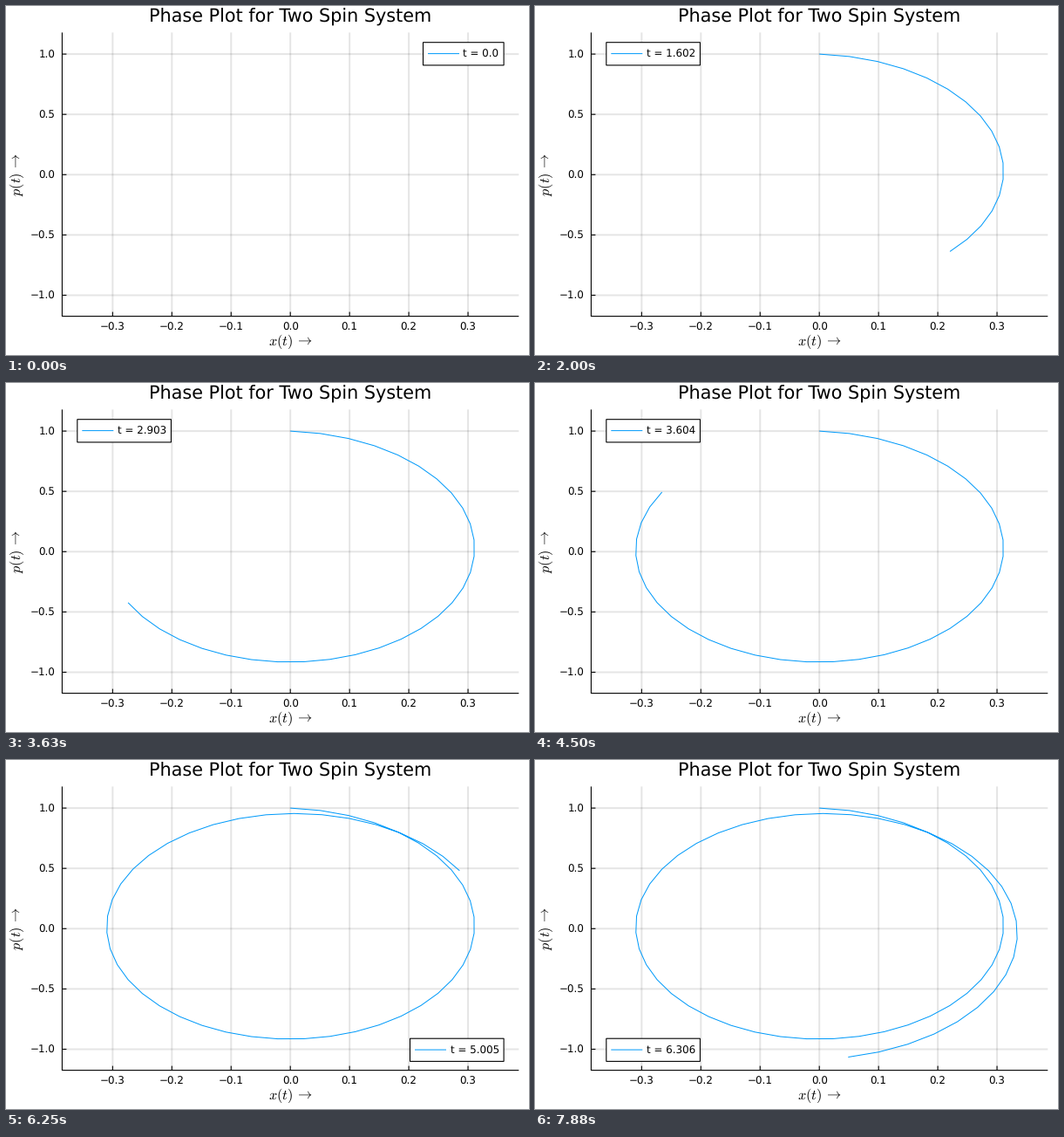
Animation of 600 by 400 pixels, one loop 8000 ms. Source, as a matplotlib script:

```python
import numpy as np
import matplotlib.pyplot as plt
from matplotlib.animation import FuncAnimation
from matplotlib.patches import Rectangle

W, H, DPI = 600, 400, 100
FRAMES, INTERVAL = 64, 125
DT = 100 / 999
PT = 72 / DPI                      # points per pixel
BLUE = "#009afa"

LEFT, RIGHT, TOP, BOTTOM = 64.4, 588.3, 30.4, 355.6
CX, CY, SX, SY = 326.2, 193.3, 679.5, 138.2

plt.rcParams.update({
    "font.family": "DejaVu Sans",
    "mathtext.fontset": "cm",
    "text.hinting": "none",
    "path.snap": False,
})

fig = plt.figure(figsize=(W / DPI, H / DPI), dpi=DPI, facecolor="white")
ax = fig.add_axes([0, 0, 1, 1])
ax.set_xlim(0, W)
ax.set_ylim(H, 0)
ax.axis("off")


def line(xs, ys, color="black", width=1.1, **kw):
    kw.setdefault("solid_capstyle", "butt")
    return ax.plot(xs, ys, color=color, lw=width * PT, **kw)[0]


def label(x, y, s, size=11.87, **kw):
    return ax.text(x, y, s, fontsize=size * PT, va="baseline", **kw)


def orbit(n):
    """Elliptic phase orbit whose radius shrinks, then grows."""
    angle = 0.1437 * n + 5.3e-5 * n**2 + 0.025 * (1 - np.exp(-n / 2))
    u = n * 3 / FRAMES
    r = 1 - 0.155 * u + 0.076 * u**2 - 0.005 * u**3 - 0.008 * np.sin(angle)
    return CX + SX * r * np.sin(angle) / 3, CY - SY * r * np.cos(angle)


def number(v):
    return f"{v:.1f}".replace("-", "\u2212")


# Grid, ticks and tick labels
for i in range(-3, 4):
    x = CX + i * 0.1 * SX
    line([x, x], [TOP, BOTTOM], width=2, alpha=0.1, zorder=1)
    line([x, x], [BOTTOM, BOTTOM - 5], zorder=2)
    label(x, 371.6, number(i / 10), ha="center")
for i in range(-2, 3):
    y = CY - i * 0.5 * SY
    line([LEFT, RIGHT], [y, y], width=2, alpha=0.1, zorder=1)
    line([LEFT, LEFT + 5], [y, y], zorder=2)
    label(56.6, y + 4.3, number(i / 2), ha="right")
line([LEFT, LEFT, RIGHT], [TOP, BOTTOM, BOTTOM], zorder=2)

label(326.4, 18.4, "Phase Plot for Two Spin System", 20.8, ha="center")
label(326, 389.4, r"$x(t)\,\rightarrow$", 16.3, ha="center")
label(16.6, 193.3, r"$p(t)\,\rightarrow$", 16.3, ha="center",
      rotation=90, rotation_mode="anchor")

xs, ys = orbit(np.arange(FRAMES))
curve = line([], [], BLUE, 1.0, zorder=3, solid_joinstyle="round")

# Legend
box = Rectangle((0, 0), 1, 26.2, fc="white", ec="black", lw=1.1 * PT, zorder=4)
ax.add_patch(box)
key = line([], [], BLUE, 1.0, zorder=5)
caption = label(0, 0, "", zorder=5)


def corner(n):
    """Legend corner (right?, bottom?) that keeps clear of the curve."""
    if n < 5:
        return True, False
    if n < 37:
        return False, False
    return n < 58, True


def draw(n):
    curve.set_data(xs[:n + 1], ys[:n + 1])
    text = f"t = {round(n * DT, 3)}"
    right, bottom = corner(n)
    width = 92.6 + 7.5 * (len(text) - 7)
    x = 571.1 - width if right else 81.8
    y = 319.2 if bottom else 41.7
    box.set_xy((x, y))
    box.set_width(width)
    key.set_data([x + 5.5, x + 41.5], [y + 12.9, y + 12.9])
    caption.set_position((x + 46, y + 17.5))
    caption.set_text(text)
    return curve, box, key, caption


anim = FuncAnimation(fig, draw, frames=FRAMES, interval=INTERVAL,
                     repeat=True, repeat_delay=0, blit=False)
plt.show()
```
